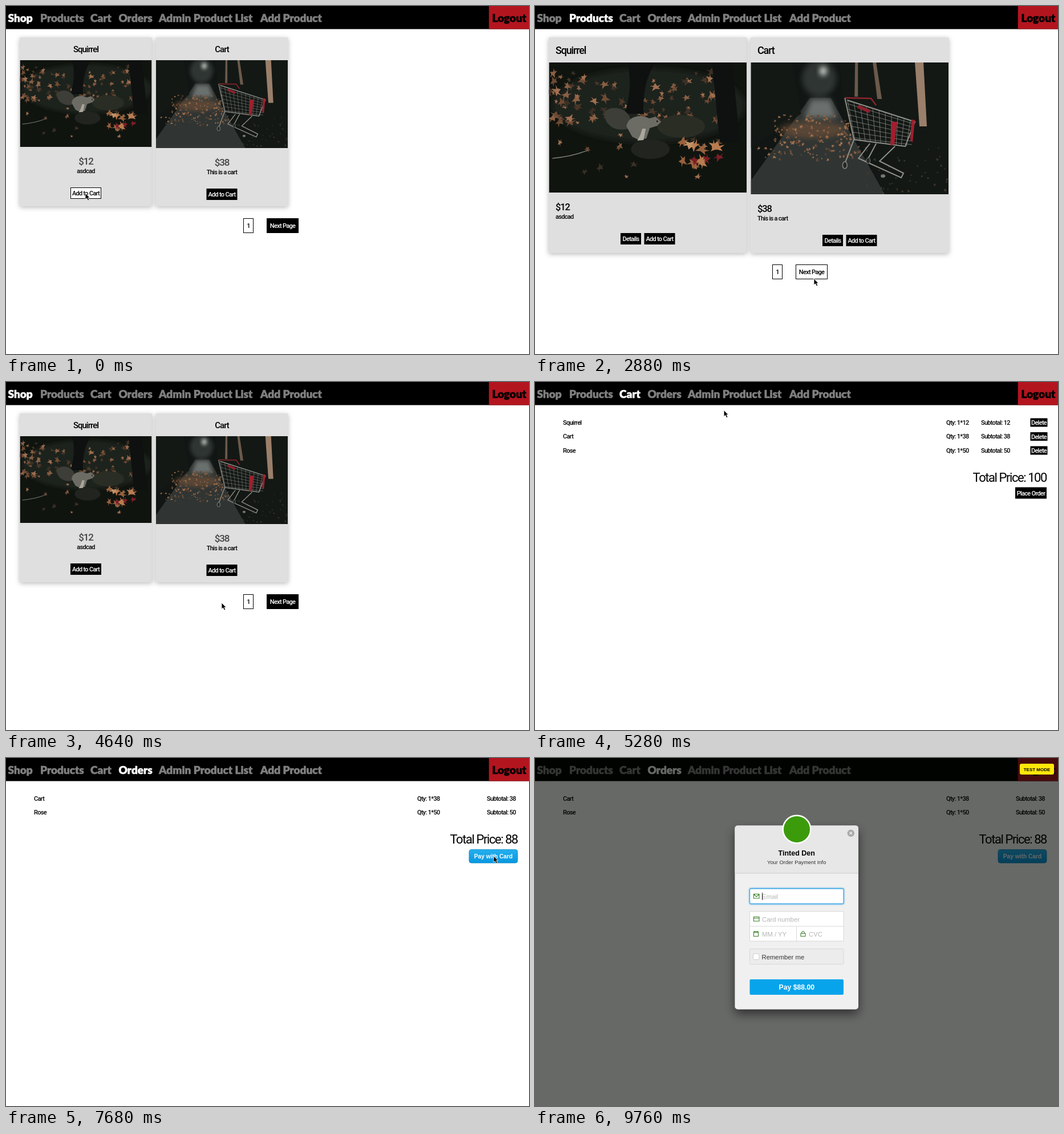
These frames come from a looping animation (917x610 px, 9920 ms). An HTML page:

```html
<!DOCTYPE html>
<html lang="en">
<head>
<meta charset="utf-8">
<title>Shop walkthrough</title>
<style>
  html, body { margin: 0; width: 100%; height: 100%; overflow: hidden; background: #fff; }
  svg { display: block; }
  text { font-family: Roboto, sans-serif; letter-spacing: -.065em; white-space: pre; }
  .nav { font: 900 19px Lato, sans-serif; letter-spacing: 0; stroke-width: .6px; }
  .form { font-family: "Liberation Sans", Arial, sans-serif; letter-spacing: 0; }
  .bold { font-weight: 700; }
  .medium { font-weight: 500; }
  .mid { text-anchor: middle; }
  .end { text-anchor: end; }
  .card { filter: drop-shadow(0 2px 4px rgba(0, 0, 0, .28)); }
</style>
</head>
<body>
<svg width="917" height="610" viewBox="0 0 917 610">
  <defs id="defs"></defs>
  <g id="stage"></g>
</svg>
<script>
const LOOP = 9920, STEP = 160;
const stage = document.getElementById('stage');
let cursor = [0, 0];

function seeded(seed) {
  return () => {
    seed = (seed * 16807) % 2147483647;
    return seed / 2147483647;
  };
}

const repeat = (n, make) => Array.from({ length: n }, (_, i) => make(i)).join('');
const rect = (x, y, w, h, fill, extra = '') =>
  `<rect x="${x}" y="${y}" width="${w}" height="${h}" fill="${fill}" ${extra}/>`;
const path = (d, fill, extra = '') => `<path d="${d}" fill="${fill}" ${extra}/>`;
const line = (d, color, width = 1, extra = '') =>
  path(d, 'none', `stroke="${color}" stroke-width="${width}" ${extra}`);
const ellipse = (x, y, rx, ry, fill, extra = '') =>
  `<ellipse cx="${x}" cy="${y}" rx="${rx}" ry="${ry}" fill="${fill}" ${extra}/>`;
const text = (x, y, size, label, cls = '', fill = '#000') =>
  `<text x="${x}" y="${y}" font-size="${size}" class="${cls}" fill="${fill}">${label}</text>`;
const photo = (id, x, y, w, h) => `<use href="#${id}" x="${x}" y="${y}" width="${w}" height="${h}"/>`;

// ---- Pictures ----
const LEAF = 'M0-6L2-1 6-3 3 1 5 4 0 3-4 6-2 0-6-2-2-2Z';

function leaves(random, n, place, colors) {
  return repeat(n, i => {
    const [x, y, size] = place(random, i);
    const turn = random() * 360;
    return path(LEAF, colors[Math.floor(random() * colors.length)],
      `transform="translate(${x} ${y}) rotate(${turn}) scale(${size} ${size * .7})"`);
  });
}

function squirrelPhoto() {
  const browns = ['#8a5f44', '#6e4a34', '#a06f50', '#4a372a', '#3c3026'];
  const random = seeded(41);
  return rect(0, 0, 347, 228, '#10140f') +
    ellipse(175, 75, 170, 65, '#1f231c', 'filter="url(#soft)"') +
    leaves(random, 105, r => [r() * 300, 16 + r() * 90, .7 + r() * 1.1], browns) +
    leaves(random, 16, r => [r() * 300, 125 + r() * 85, .7 + r() * .7], browns) +
    path('M138 0H188Q164 30 166 90H132Q148 50 138 0ZM286 0H322L335 140H300Z', '#0e1110') +
    ellipse(232, 112, 42, 20, '#2a2d24') + ellipse(178, 152, 34, 17, '#22251f') +
    line('M6 168Q40 165 68 154', '#7d7e75', 1.5) +
    leaves(random, 11, r => [208 + r() * 90, 136 + r() * 42, 1.5 + r() * .9], ['#b87c50', '#98613d', '#c39166']) +
    leaves(random, 3, (r, i) => [256 + i * 21, 172 - i * 3, 1.6], ['#7d1e26']) +
    path('M140 116C112 124 94 104 98 86C112 74 138 80 143 99Z', '#3d3e38') +
    path('M136 112C138 96 158 89 176 98L187 95 197 104 190 111 177 115 171 133 158 136 146 130Z', '#6c6c65') +
    path('M160 128L164 116 170 116 166 136 155 137Z', '#aaa79d') + ellipse(190, 103, 1.5, 1.5, '#17120d');
}

function cartPhoto() {
  const random = seeded(77);
  const mesh = repeat(11, i => line(`M${170 + i * 11} ${68 + i * 3.4}L${183 + i * 9} ${137 + i}`, '#85857f', .8)) +
    repeat(7, i => line(`M${169 + i * 2} ${72 + i * 10}L${287 - i * .7} ${108 + i * 6}`, '#85857f', .8));
  return rect(0, 0, 347, 231, '#111614') +
    ellipse(120, 28, 30, 32, '#2f3531', 'filter="url(#soft)"') +
    ellipse(127, 15, 6, 8, '#dadcd6', 'filter="url(#soft)"') +
    path('M104 62H140L235 231H0V207Z', '#303533') +
    path('M106 65H139L150 97H94Z', '#6a706d', 'filter="url(#soft)"') +
    path('M0 0H72L88 90 0 150ZM156 0H347V231H236L164 90Z', '#131815') +
    ellipse(108, 118, 58, 15, '#735139', 'filter="url(#soft)" opacity=".6"') +
    leaves(random, 170, r => {
      const y = 92 + r() * 80;
      return [108 + (r() - .5) * (y < 142 ? 135 : 190), y, .3 + r() * .45];
    }, ['#8d6143', '#a5734f', '#644837']) +
    leaves(random, 45, r => [190 + r() * 155, 150 + r() * 80, .3 + r() * .3], ['#3b3c31', '#4a3a2e']) +
    path('M288 0H303L309 112H296Z', '#9a7f6a') + path('M214 0H220L230 64H222ZM183 0H188V60H182Z', '#6a5a4b') +
    mesh +
    line('M165 62L181 135 271 147 288 104 169 66M181 135L165 177M209 142L189 168 264 202 268 194 226 173 253 147M220 142L203 174', '#8f8f89', 2) +
    line('M166 62L211 63 220 75', '#8c242c', 2.4) + line('M188 77L209 86', '#8c222d', 6) +
    path('M247 104L257 104 252 144 245 145ZM282 100L288 101 284 140 280 136Z', '#a21e2d') +
    ellipse(165, 180, 4, 6, '#252827', 'stroke="#858580" stroke-width="1.5"') +
    ellipse(206, 172, 3.5, 5, '#252827', 'stroke="#858580"') + ellipse(232, 199, 4, 3, '#777');
}

function rosePhoto() {
  const random = seeded(19);
  const blobs = repeat(42, () => ellipse(15 + random() * 420, 130 + random() * 95, 8 + random() * 18,
    6 + random() * 13, ['#2c4a33', '#37593c', '#243a2a', '#476a49'][Math.floor(random() * 4)]));
  const leaf = (x, y, turn, size = 1) => path('M0-24C16-12 14 14 0 24C-14 14-16-10 0-24Z', '#41663f',
    `transform="translate(${x} ${y}) rotate(${turn}) scale(${size})"`);
  return rect(0, 0, 450, 299, '#1b231e') +
    `<g filter="url(#soft)">` +
    ellipse(75, 70, 95, 75, '#272c27') + ellipse(195, 48, 26, 14, '#555c59') + ellipse(170, 80, 20, 12, '#555c59') +
    ellipse(250, 72, 38, 14, '#565f5b') + ellipse(260, 20, 35, 18, '#2b4633') +
    ellipse(345, 50, 30, 12, '#29402f') + ellipse(330, 120, 60, 40, '#28352d') + blobs +
    ellipse(295, 115, 24, 18, '#56795b') + ellipse(250, 180, 18, 14, '#4b7050') +
    ellipse(290, 225, 20, 16, '#638467') + ellipse(379, 177, 15, 11, '#758b77') +
    ellipse(345, 275, 145, 32, '#0f1613') + ellipse(40, 265, 50, 28, '#1a221d') +
    ellipse(430, 62, 9, 8, '#476a4b') + '</g>' +
    ellipse(41, 70, 12, 12, '#5c2b31') + ellipse(172, 143, 11, 9, '#8f6246', 'filter="url(#soft)"') +
    path('M184 105L201 100 203 137 189 138Z', '#7b887c', 'filter="url(#soft)"') +
    line('M215 145Q190 160 188 200M84 279Q120 270 170 293M120 235L142 299M0 200L45 217', '#29332a', 3) +
    path('M190 110Q202 124 190 137Q178 124 190 110Z', '#304c34') +
    ellipse(229, 106, 28, 19, '#4f0c13') + ellipse(255, 126, 15, 20, '#74121a') +
    ellipse(235, 128, 30, 24, '#6b1018') + ellipse(238, 122, 22, 19, '#961520') +
    path('M204 151Q220 140 243 150Q238 156 226 154Z', '#6b1018') +
    line('M218 124Q224 106 244 112Q256 118 250 130M226 127Q238 112 244 128M209 130Q222 146 250 140', '#480b12', 3) +
    path('M417 210L422 198 433 198 432 211 421 216Z', '#7d2830') +
    leaf(75, 249, -18) + leaf(55, 286, 70) + leaf(82, 290, 8, .8) + leaf(118, 287, -70, .7) +
    leaf(154, 273, -58, .8) + leaf(210, 279, -70, .8) + leaf(192, 228, 8, .8) +
    ellipse(120, 233, 6, 12, '#2d4230') + ellipse(144, 243, 5, 9, '#2d4230');
}

function woodsPhoto() {
  return rect(0, 0, 347, 231, '#18211b') + ellipse(175, 100, 130, 70, '#2c3a2f', 'filter="url(#soft)"') +
    path('M70 0H95L100 231H62ZM240 0H262L270 231H236Z', '#101512');
}

const symbol = (id, w, h, content) => `<symbol id="${id}" viewBox="0 0 ${w} ${h}" preserveAspectRatio="none">${content}</symbol>`;
document.getElementById('defs').innerHTML =
  `<filter id="soft" x="-50%" y="-50%" width="200%" height="200%"><feGaussianBlur stdDeviation="5"/></filter>
   <filter id="shadow" x="-20%" y="-20%" width="140%" height="140%"><feDropShadow dx="0" dy="8" stdDeviation="9" flood-opacity=".55"/></filter>
   <filter id="glow" x="-10%" y="-40%" width="120%" height="180%"><feDropShadow dx="0" dy="0" stdDeviation="1.8" flood-color="#34a5e8"/></filter>
   <linearGradient id="blue" x2="0" y2="1"><stop stop-color="#25b0ee"/><stop offset="1" stop-color="#0897e0"/></linearGradient>` +
  symbol('squirrel', 347, 228, squirrelPhoto()) + symbol('cart', 347, 231, cartPhoto()) +
  symbol('rose', 450, 299, rosePhoto()) + symbol('woods', 347, 231, woodsPhoto());

// ---- Page parts ----
function button(x, y, w, h, label, plain = false) {
  const [px, py] = cursor;
  const light = plain || (px >= x && px <= x + w && py >= y && py <= y + h);
  return rect(x + .5, y + .5, w - 1, h - 1, light ? '#fff' : '#000', 'stroke="#000"') +
    text(x + w / 2, y + h / 2 + 4, 11, label, 'mid medium', light ? '#000' : '#fff');
}

const LINKS = [['Shop', 3.5], ['Products', 60], ['Cart', 148], ['Orders', 197.5], ['Admin Product List', 268], ['Add Product', 446]];

function navLink(label, x, color) {
  return `<text class="nav" x="${x}" y="27.5" fill="${color}" stroke="${color}">${label}</text>`;
}

function nav(active) {
  return rect(0, 0, 917, 40.5, '#000') + rect(846.7, 0, 70.3, 40.5, '#b3151f') +
    LINKS.map(([label, x]) => navLink(label, x, label === active ? '#fff' : '#808080')).join('') +
    navLink('Logout', 852.5, '#000');
}

const panel = (x, w, h) => rect(x, 55, w, h, '#e0dfe0', 'class="card" rx="1"');

function shopCard(x, id, title, photoHeight, price, info) {
  const base = 95 + photoHeight, center = x + 116;
  return panel(x, 232, 296) + text(center, 80.5, 15, title, 'mid medium') +
    photo(id, x + .5, 95, 231, photoHeight) +
    text(center, base + 31, 17, price, 'mid medium', '#444') +
    text(center, base + 45.5, 11, info, 'mid medium') +
    button(x + 89, base + 71, 54, 20, 'Add to Cart');
}

function productCard(x, id, title, photoHeight, price, info) {
  const base = 99 + photoHeight;
  return panel(x, 347.5, 378) + text(x + 12, 84, 18, title, 'medium') +
    photo(id, x + .5, 99, 346.5, photoHeight) +
    text(x + 12, base + 31, 16.5, price, 'medium') + text(x + 12, base + 45.5, 11, info, 'medium') +
    button(x + 126, base + 71, 36, 20, 'Details') + button(x + 167.5, base + 71, 54, 20, 'Add to Cart');
}

const pager = y => button(416, y, 18, 26, '1', true) + button(457, y, 56, 26, 'Next Page');

function itemList(items, ordered) {
  const total = items.reduce((sum, [, price]) => sum + price, 0);
  const shift = (items.length - 2) * 24.5;
  return items.map(([name, price], i) => {
    const y = 74.5 + i * 24.5;
    return text(49, y, 11, name, 'medium') + text(721, y, 11, `Qty: 1*${price}`, 'medium') +
      text(ordered ? 843 : 782, y, 11, `Subtotal: ${price}`, 'medium') +
      (ordered ? '' : button(868.5, y - 11, 30, 15, 'Delete'));
  }).join('') +
    text(897, 150 + shift, 22, `Total Price: ${total}`, 'end') +
    (ordered
      ? rect(812, 160.5, 85, 23.5, 'url(#blue)', 'rx="4" stroke="#0c86c4" stroke-width=".8"') +
        text(854.5, 175.5, 10.2, 'Pay with Card', 'form bold mid', '#fff')
      : button(842, 160 + shift, 55, 20, 'Place Order'));
}

// ---- Pages ----
const SQUIRREL = ['Squirrel', 12], CART = ['Cart', 38], ROSE = ['Rose', 50];

const shop = () => nav('Shop') +
  shopCard(24, 'squirrel', 'Squirrel', 152, '$12', 'asdcad') +
  shopCard(262.5, 'cart', 'Cart', 154, '$38', 'This is a cart') + pager(372);

const products = () => nav('Products') +
  productCard(24, 'squirrel', 'Squirrel', 228, '$12', 'asdcad') +
  productCard(378, 'cart', 'Cart', 231, '$38', 'This is a cart') + pager(453);

const moreProducts = () => nav('Products') +
  productCard(24, 'woods', 'Woods', 231, '$20', 'Woods') +
  productCard(378, 'rose', 'Rose', 231, '$50', 'This is a rose') +
  button(368, 453, 74, 26, 'Previous Page') + button(457, 453, 18, 26, '2', true);

const detail = () => nav('Products') + text(459, 90, 22.5, 'Rose', 'mid medium') +
  rect(9, 110, 899.5, 1.2, '#555') + photo('rose', 234, 117.5, 450, 299.5) +
  text(459, 451, 17, '50', 'mid medium') + text(459, 479.5, 11, 'This is a rose', 'mid medium') +
  button(432, 494, 54, 20, 'Add to Cart');

const fullCart = () => nav('Cart') + itemList([SQUIRREL, CART, ROSE]);
const cart = () => nav('Cart') + itemList([CART, ROSE]);
const order = () => nav('Orders') + itemList([CART, ROSE], true);

function checkout() {
  const field = (x, y, w, h, extra = 'stroke="#d8d8d8"') => rect(x, y, w, h, '#fff', extra);
  const label = (x, y, value, color = '#b5b5b5') => text(x, y, 11.3, value, 'form', color);
  const icon = d => line(d, '#3a8029', 1.1);
  return rect(0, 0, 917, 610, '#020602', 'opacity=".6"') +
    rect(850, 10, 60, 19, '#ffe70a', 'rx="3"') + text(880, 22.7, 8, 'TEST MODE', 'form bold mid') +
    rect(350.5, 118.5, 216.5, 322, '#f0f0f0', 'rx="5" filter="url(#shadow)"') +
    path('M350.5 202V123.5Q350.5 118.5 355.5 118.5H562Q567 118.5 567 123.5V202Z', '#e7e7e7') +
    rect(350.5, 201.5, 216.5, 1, '#ccc') +
    ellipse(459, 125, 24.3, 24.3, '#3c9b0b', 'stroke="#fff" stroke-width="2.5"') +
    ellipse(553.8, 131.8, 6.2, 6.2, '#aaa') + line('M551.5 129.5L556 134M556 129.5L551.5 134', '#eee', 1.4) +
    text(458.7, 171, 12.5, 'Tinted Den', 'form bold mid') +
    text(458.7, 186, 9.4, 'Your Order Payment Info', 'form mid', '#333') +
    field(376.5, 229, 164.5, 26.5, 'rx="2" stroke="#45aae5" stroke-width="1.3" filter="url(#glow)"') +
    icon('M383.5 238.5H393V246H383.5ZM383.5 239L388.2 243 393 239') + label(398, 247, 'Email') +
    rect(398, 236, 1, 13, '#222') +
    field(376.5, 269, 164.5, 52) + line('M376.5 295H541M458.5 295V321', '#d8d8d8') +
    icon('M383.5 278.5H393V286H383.5ZM383.5 281H393') + label(398, 287, 'Card number') +
    icon('M383.5 304.5H391.5V312.5H383.5ZM383.5 306H391.5M385.5 303V305M389.5 303V305') + label(398, 312.8, 'MM / YY') +
    icon('M466 307.5H474V312.5H466ZM467.7 307.5V305.5Q470 302 472.3 305.5V307.5') + label(480, 312.8, 'CVC') +
    rect(376.5, 334.5, 164.5, 27, '#ececec', 'rx="2" stroke="#d8d8d8"') +
    field(382.5, 343, 10.5, 10.5, 'rx="2" stroke="#ccc"') + label(397.5, 352.5, 'Remember me', '#333') +
    rect(376.5, 388, 164.5, 27, '#08a4eb', 'rx="2"') +
    text(458.8, 405.5, 12.2, 'Pay $88.00', 'form bold mid', '#fff');
}

// ---- Timeline ----
const PAGES = [[0, shop], [1760, products], [3040, moreProducts], [3520, detail],
  [4640, shop], [5280, fullCart], [6240, cart], [7200, order]];

// Each entry: time, x, y of the pointer tip
const MOVES = [[0, 139, 328], [480, 139, 328], [960, 377, 331], [1120, 377, 331],
  [1600, 98, 20], [1760, 98, 20], [2560, 489, 478], [3040, 489, 478], [3360, 523, 411],
  [3680, 523, 411], [4160, 460, 501], [4480, 460, 501], [4640, 378, 387], [4960, 167, 20], [5120, 167, 20],
  [5600, 800, 134], [5920, 887, 71], [6400, 887, 71], [6720, 870, 171], [7200, 870, 171],
  [7840, 852, 172], [8160, 850, 175], [LOOP, 850, 175]];

function cursorAt(time) {
  const next = MOVES.findIndex(move => move[0] > time);
  const [t0, x0, y0] = MOVES[next - 1], [t1, x1, y1] = MOVES[next];
  const p = (time - t0) / (t1 - t0), eased = p * p * (3 - 2 * p);
  return [x0 + (x1 - x0) * eased, y0 + (y1 - y0) * eased];
}

const arrow = (x, y) => path('M0 0V11L2.6 8.7 4.7 13 6.8 12 4.8 8H8Z', '#000',
  `stroke="#fff" stroke-width=".8" transform="translate(${x} ${y})"`);

function render(time) {
  cursor = cursorAt(time);
  const page = PAGES.filter(([start]) => start <= time).pop()[1];
  let content = rect(0, 0, 917, 610, '#fff') + page();
  if (time >= 9120) content += checkout();
  else if (time >= 8960) content += rect(0, 40, 917, 570, '#000', 'opacity=".012"');
  if (time < 9440) content += arrow(...cursor);
  stage.innerHTML = content;
}

let shown = -1;
function tick() {
  const time = Math.floor(performance.now() % LOOP / STEP) * STEP;
  if (time !== shown) render(shown = time);
  requestAnimationFrame(tick);
}
tick();
</script>
</body>
</html>
```
